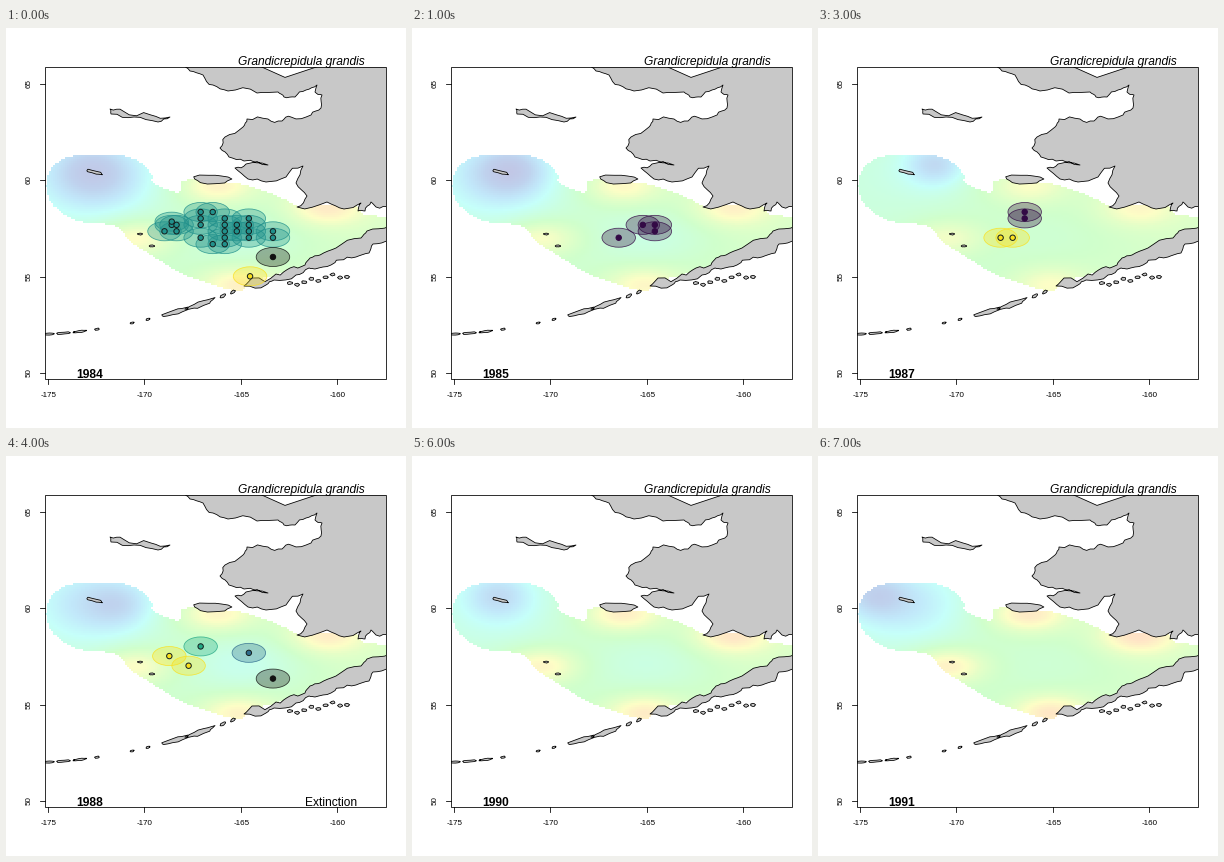
A matplotlib script that plays this animation: 400 by 400 pixels, repeating every 8 s.

```python
import numpy as np
import matplotlib.pyplot as plt
from matplotlib.animation import ArtistAnimation
from matplotlib.colors import LinearSegmentedColormap
from matplotlib.patches import Ellipse, Polygon, Rectangle
from matplotlib.path import Path

SIZE, DPI = 400, 100
PX = 72 / DPI  # one pixel in points
THIN = 0.8 * PX
LEFT, TOP, RIGHT, BOTTOM = 39, 39, 380, 351
CELL = 2

plt.rcParams["font.family"] = "Liberation Sans"
rng = np.random.default_rng(4)

# Key points of the coasts, in stage pixels
MAINLAND = [
    (174, 36), (184, 43), (197, 47), (207, 57), (222, 63), (251, 65), (272, 64),
    (278, 69), (289, 69), (300, 62), (311, 57), (309, 64), (316, 67), (315, 80),
    (305, 87), (285, 89), (276, 93), (262, 91), (241, 91), (237, 99), (219, 109),
    (214, 120), (223, 129), (238, 133), (262, 137), (240, 136), (229, 140),
    (242, 151), (260, 154), (280, 149), (297, 138), (290, 155), (301, 168),
    (291, 179), (321, 174), (338, 181), (355, 175), (352, 183), (359, 183),
    (365, 174), (370, 179), (384, 176), (384, 36),
]
PENINSULA = [
    (384, 198), (361, 203), (355, 210), (330, 220), (314, 227), (304, 230),
    (299, 237), (284, 240), (270, 246), (246, 250), (238, 258), (260, 257),
    (268, 252), (290, 247), (303, 240), (309, 241), (325, 237), (333, 232),
    (350, 229), (363, 225), (367, 216), (384, 212),
]
ST_LAWRENCE = [(104, 81), (117, 83), (145, 87), (164, 89), (152, 94), (128, 89),
               (105, 86)]
# Arc of islands: x, length, thickness
CHAIN = [(42, 12, 2), (57, 15, 2), (74, 14, 2), (91, 5, 2), (126, 4, 2),
         (142, 4, 2), (169, 26, 5), (195, 28, 6), (217, 6, 3), (227, 5, 3)]
SURVEY = [
    (40, 158), (46, 140), (62, 129), (85, 127), (112, 127), (132, 133), (146, 147),
    (147, 155), (166, 163), (174, 163), (177, 153), (200, 152), (235, 156),
    (258, 163), (278, 171), (295, 179), (320, 177), (350, 178), (357, 186),
    (380, 190), (378, 202), (330, 222), (303, 237), (270, 247), (246, 253),
    (234, 263), (205, 256), (175, 245), (150, 230), (125, 214), (110, 198),
    (72, 193), (48, 178),
]

# Per year: northwest cold, core (x, y, cold), mid-shelf cold, shore warmth
SEASONS = {
    1984: (.40, 85, 140, .10, .10, .25),
    1986: (.26, 115, 142, .30, .12, .20),
    1987: (.06, 118, 136, .32, .03, .19),
    1988: (.30, 116, 148, .14, .15, .24),
    1989: (.05, 118, 140, .16, .17, .25),
    1991: (.26, 55, 138, .24, .04, .29),
}
for gap in (1985, 1990):
    SEASONS[gap] = np.mean([SEASONS[gap - 1], SEASONS[gap + 1]], axis=0)
SHORES = [(210, 158), (320, 180), (128, 210), (232, 257)]

SCALE = LinearSegmentedColormap.from_list("sea", [
    (0, "#c2c4e4"), (.15, "#bfd2ee"), (.28, "#c2e8fa"), (.40, "#c6fffa"),
    (.50, "#cbffe2"), (.60, "#d0ffcc"), (.70, "#e4ffc8"), (.79, "#fdfec6"),
    (.88, "#ffeac6"), (1, "#ffd2c6"),
])

TEAL, GREEN, BLUE = "#21918c", "#22a884", "#2f6c8e"
YELLOW, PURPLE, BLACK = "#fbe01c", "#330a45", "#111111"

# Sightings by year and colour, as (column, row) of the station grid
HAULS = [(3, 4), (3, 5, 7), (.6, 1, 3, 5, 6, 7), (0, 1, 5, 6, 7, 9),
         (3, 5, 7, 9), (4, 5)]
SIGHTINGS = {
    1984: {TEAL: [(col, row) for row, cols in enumerate(HAULS) for col in cols]
           + [(.6, 1.5)],
           YELLOW: [(7.1, 10)], BLACK: [(9, 7)]},
    1985: {PURPLE: [(4, 4), (6, 2), (7, 2), (7, 3)]},
    1986: {PURPLE: [(2, 4), (4, 4), (6, 2), (7, 2), (6, 3), (9, 2)]},
    1987: {YELLOW: [(2, 4), (3, 4)], PURPLE: [(4, 0), (4, 1)]},
    1988: {YELLOW: [(.4, 2.5), (2, 4)], GREEN: [(3, 1)], BLUE: [(7, 2)],
           BLACK: [(9, 6)]},
}

fig = plt.figure(figsize=(SIZE / DPI, SIZE / DPI), dpi=DPI, facecolor="white")
ax = fig.add_axes([0, 0, 1, 1])
ax.axis("off")
frame = Rectangle((LEFT, TOP), RIGHT - LEFT, BOTTOM - TOP, fill=False,
                  ec="black", lw=THIN, zorder=6)
ax.add_patch(frame)


def rough(points, passes=2, amount=.09):
    """Closed outline with midpoints pushed sideways at random."""
    pts = np.array(points, float)
    for _ in range(passes):
        step = np.roll(pts, -1, axis=0) - pts
        side = np.column_stack([-step[:, 1], step[:, 0]])
        mid = pts + step / 2 + side * rng.normal(0, amount, (len(pts), 1))
        pts = np.stack([pts, mid], axis=1).reshape(-1, 2)
    return pts


def smooth(points, steps=6):
    """Closed Catmull-Rom curve."""
    p = np.array(points, float)[:, None]
    a, c, d = (np.roll(p, k, axis=0) for k in (1, -1, -2))
    t = np.arange(steps)[None, :, None] / steps
    curve = (2 * p + (c - a) * t + (2 * a - 5 * p + 4 * c - d) * t ** 2
             + (3 * p - a - 3 * c + d) * t ** 3) / 2
    return curve.reshape(-1, 2)


def blob(x, y, length, thick, slope=0.0):
    """Ragged oval with a sloping long axis."""
    angle = np.linspace(0, 2 * np.pi, 14, endpoint=False)
    radius = rng.uniform(.75, 1.15, angle.size) / 2
    dx = length * radius * np.cos(angle)
    return np.column_stack([x + dx, y + slope * dx + thick * radius * np.sin(angle)])


def add_land(points):
    land = Polygon(points, closed=True, fc="#c8c8c8", ec="black", lw=THIN,
                   joinstyle="round", zorder=2)
    ax.add_patch(land)
    land.set_clip_path(frame)


def draw_land():
    for coast in (MAINLAND, PENINSULA, ST_LAWRENCE):
        add_land(rough(coast))
    add_land(blob(206, 151, 36, 9))
    add_land(blob(88, 144, 18, 3, .25))
    add_land(blob(134, 206, 5, 2))
    add_land(blob(146, 218, 5, 2))
    for x, length, thick in CHAIN:
        run = x - 45
        add_land(blob(x, 306 - .06 * run - .00094 * run ** 2, length, thick,
                      -.06 - .0019 * run))
    for x in np.linspace(284, 341, 9):
        add_land(blob(x, 256 - .16 * (x - 284) + rng.uniform(-3, 3), 5, 3))


def label(x, y, text, size=12, **style):
    return ax.text(x, y, text, fontsize=size * PX, color="black", zorder=7, **style)


def draw_axes():
    for i in range(4):
        x, y = 42 + 96.4 * i, 56 + 96.4 * i
        ax.plot([x, x], [BOTTOM, BOTTOM + 5], color="black", lw=THIN)
        ax.plot([LEFT - 5, LEFT], [y, y], color="black", lw=THIN)
        label(x + .5, 369, str(5 * i - 175), 8, ha="center", va="baseline")
        label(23.5, y - .5, str(65 - 5 * i), 8, rotation=90, ha="center", va="center")


gx, gy = np.meshgrid(np.arange(LEFT, RIGHT, CELL) + CELL / 2,
                     np.arange(TOP, BOTTOM, CELL) + CELL / 2)
cells = np.column_stack([gx.ravel(), gy.ravel()])
outside = ~Path(smooth(SURVEY)).contains_points(cells).reshape(gx.shape)
extent = (LEFT, LEFT + CELL * gx.shape[1], TOP + CELL * gx.shape[0], TOP)


def bump(x, y, wide, high):
    return np.exp(-((gx - x) / wide) ** 2 / 2 - ((gy - y) / high) ** 2 / 2)


def temperature(year):
    """Sea temperature from 0 (cold) to 1 (warm)."""
    northwest, core_x, core_y, core, shelf, shore = SEASONS[year]
    temp = .59 + .06 * (gx - 200) / 180
    temp -= northwest * bump(90, 148, 42, 28) + core * bump(core_x, core_y, 22, 16)
    temp -= shelf * bump(240, 208, 42, 20)
    for x, y in SHORES:
        temp += shore * bump(x, y, 28, 13)
    return np.ma.array(temp, mask=outside)


def sighting(col, row, color):
    x, y = 158.5 + 12.05 * col, 184 + 6.43 * row
    halo = Ellipse((x, y), 33.5, 19, fc=(color, .32), ec=(color, .8), lw=THIN, zorder=3)
    dot = Ellipse((x, y), 5.4, 5.4, fc=color, lw=PX, zorder=4,
                  ec=color if color in (PURPLE, BLACK) else "#14201f")
    return [ax.add_patch(halo), ax.add_patch(dot)]


def draw_year(year):
    sea = ax.imshow(temperature(year), cmap=SCALE, vmin=0, vmax=1, extent=extent,
                    interpolation="nearest", aspect="auto", zorder=1)
    parts = [sea, label(70.5, 350, str(year), weight="bold")]
    for color, places in SIGHTINGS.get(year, {}).items():
        for col, row in places:
            parts += sighting(col, row, color)
    if year == 1988:
        parts.append(label(299, 350, "Extinction"))
    return parts


draw_land()
draw_axes()
label(231.5, 37, "Grandicrepidula grandis", style="italic")
years = [draw_year(year) for year in range(1984, 1992)]
ax.set_xlim(0, SIZE)
ax.set_ylim(SIZE, 0)

anim = ArtistAnimation(fig, years, interval=1000, repeat=True, repeat_delay=0)
plt.show()
```
